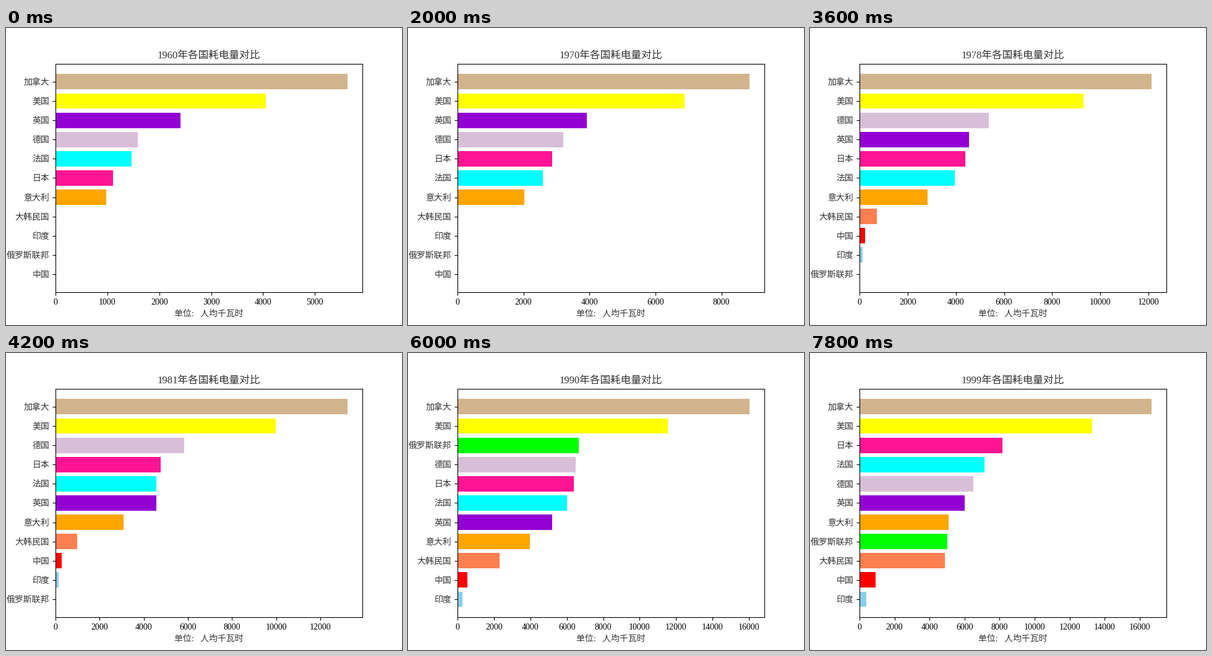
Animation of 640 by 480 pixels, one loop 8 s. Source, as a matplotlib script:

```python
import matplotlib.pyplot as plt
import numpy as np
from matplotlib.animation import FuncAnimation

INK = "0.2"  # softens the sans strokes to the weight of a thin brush face
plt.rcParams.update({
    "font.family": ["Liberation Serif", "Noto Sans CJK JP"],
    "axes.titlecolor": INK,
    "axes.labelcolor": INK,
    "ytick.labelcolor": INK,
})

FIRST, LAST = 1960, 1999
YEARS = np.arange(FIRST, LAST + 1)
KNOTS = [1960, 1967, 1974, 1981, 1987, 1994, 1999]


def growth(*values, start=None):
    """Constant growth rate between the last knots; zero before the start year."""
    years, values = KNOTS[-len(values):], list(values)
    if start:
        years, values = [start[0]] + years, [start[1]] + values
    curve = np.exp(np.interp(YEARS, years, np.log(values)))
    return np.where(YEARS < years[0], 0, curve)


# kWh per head
COUNTRIES = {
    "加拿大": ("tan", growth(5632, 7630, 10810, 13240, 15800, 16380, 16690)),
    "美国": ("yellow", growth(4050, 5905, 8455, 9980, 10903, 12465, 13285)),
    "英国": ("darkviolet", growth(2412, 3506, 4530, 4560, 5084, 5374, 6007)),
    "德国": ("thistle", growth(1585, 2359, 4805, 5831, 6656, 6241, 6502)),
    "法国": ("cyan", growth(1471, 2181, 3272, 4570, 5655, 6519, 7138)),
    "日本": ("deeppink", growth(1110, 2262, 3959, 4766, 5645, 7524, 8162)),
    "意大利": ("orange", growth(980, 1696, 2540, 3084, 3679, 4438, 5088)),
    "大韩民国": ("coral", growth(458, 981, 1672, 3502, 4876, start=(1971, 300))),
    "印度": ("skyblue", growth(114, 145, 235, 350, 390, start=(1971, 99))),
    "俄罗斯联邦": ("lime", growth(5201, 5018, start=(1990, 6673))),
    "中国": ("red", growth(183, 280, 435, 728, 919, start=(1971, 151))),
}

fig, ax = plt.subplots(figsize=(6.4, 4.8), dpi=100)


def draw(i):
    ax.clear()
    rows = [(name, color, use[i]) for name, (color, use) in COUNTRIES.items()]
    rows.sort(key=lambda row: -row[2])
    names, colors, values = zip(*reversed(rows))
    ax.barh(range(len(names)), values, color=colors, tick_label=names)
    ax.set_title(f"{FIRST + i}年各国耗电量对比")
    ax.set_xlabel("单位:   人均千瓦时")


anim = FuncAnimation(fig, draw, frames=len(YEARS), init_func=lambda: None,
                     interval=200, repeat=True, repeat_delay=0)
plt.show()
```
